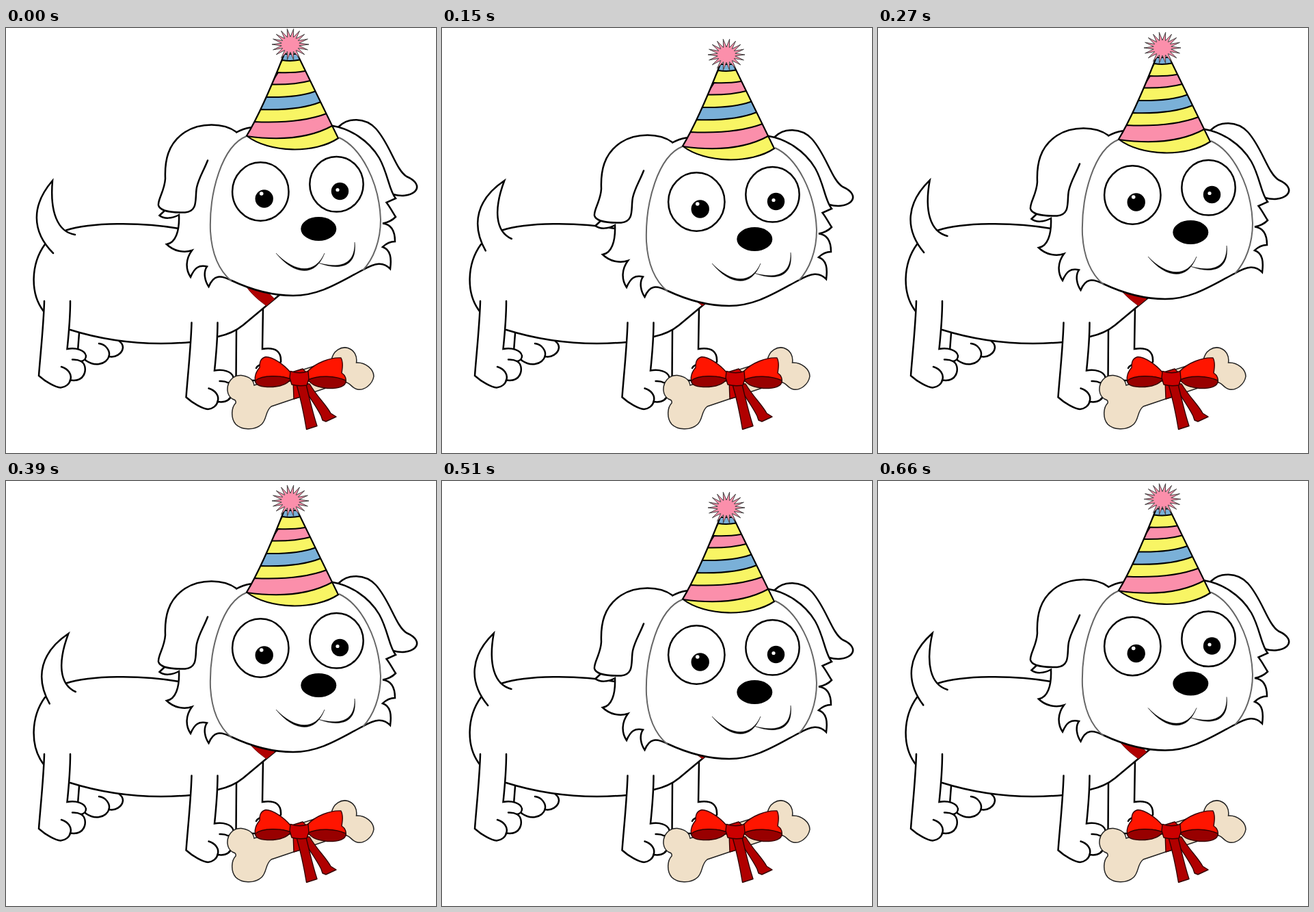
These frames come from a looping animation (629x621 px, 0.69 s). An HTML page:

```html
<!DOCTYPE html>
<html lang="en">
<head>
<meta charset="utf-8">
<title>Birthday puppy</title>
<style>
html, body { margin: 0; width: 100%; height: 100%; overflow: hidden; background: #fff; }
svg { display: block; width: 629px; height: 621px; }
.ink { fill: #fff; stroke: #000; stroke-width: 2.5; stroke-linejoin: miter; stroke-linecap: round; }
.line { fill: none; }
.face { fill: none; stroke: #666; stroke-width: 2; }
.bone { fill: #f0e0c8; stroke: #222; stroke-width: 1.5; }
.bow { stroke: #300; stroke-width: 1.4; stroke-linejoin: round; }
.red { fill: #ff1500; }
.mid { fill: #cc0000; }
.dark { fill: #b00000; }
.deep { fill: #980000; }
</style>
</head>
<body>
<svg viewBox="0 0 629 621">
  <defs>
    <g id="leg">
      <path d="M56 399C55 435 50 480 48 508C58 517 72 525 80 525.500C87 525 93 520 94 514.500C104 516 112 513 115 504C117 497 115 490 110 487C115 486 117 482 117 479C115 470 102 467 89.500 469C92 445 94 420 94 399"/>
      <path class="line" d="M97 484.500Q104 484 110 487M81 495C91 498 97 506 94 515"/>
    </g>
    <clipPath id="cone"><path id="coneShape" d="M407 38L426 38L486 161C452 184 385 183 352 157.500C370 128 392 76 407 38Z"/></clipPath>
  </defs>

  <g class="ink">
    <path d="M107 446L105 472C112 478 114 483 117 486C123 490 130 492 136 491C144 490 149 485 150.500 480C160 482 170 476 171 467C171 462 168 459 165 457"/>
    <path class="line" d="M136 461C146 462 153 472 150.500 480"/>
    <path d="M337 441L336.500 515L372 515L402 488C403 473 395 466 375 469L376 408"/>
    <path class="line" d="M366 497Q368 493 373 492"/>
    <path stroke="none" d="M88 295.500C122 284 198 283 253 293L405 386L380 406.500L347 434C335 443 325 448 310 451C240 468 145 458 94 441L55 416C35 390 34 345 57 316Z"/>
    <path class="line" d="M88 295.500C122 284 198 283 253 293M405 386L380 406.500L347 434C336 443 324 448 310 451M271 459C204 465 145 457 94 441M55 414C35 388 36 345 57 316"/>
    <use href="#leg"/>
    <use href="#leg" x="215.500" y="31.500"/>
    <path id="tail" d="M69 329C37 297 37 259 68 223C64 268 75 298 101 302"/>
  </g>

  <path d="M345 366C353 384 366 395 381 406L393 396C386 389 379 383 374 374Z" fill="#b00000" stroke="#600" stroke-width=".8"/>

  <g id="head">
    <g class="ink">
      <path d="M487 144C500 131 525 130 541 147C562 170 570 207 586 217C600 223 605 232 598 239C590 246 577 246 566 243"/>
      <path d="M234 265L224.500 274C231 279 242 279 253 273C254 297 248 314 235 316C245 326 260 329 272 325C263 337 262 352 270 364C276 350 282 346 294 348.500C288 357 291 370 296.500 378C304 360 314 361 330 369C362 384 392 391 420 391C460 391 490 370 522 353.500C540 343 552 341 562 352C564 337 563 324 551 320C556 315 562 312 569 312C569 298 565 287 551 285.500C560 284 565 281 570 276C566 270 562 262 556.500 255L570 249C560 237 559 213 546 190C530 163 502 147 478 143L357 145.500Q347 147 337 152.500"/>
      <path d="M337 152C318 138 284 138 262 152C236 169 232 195 233 220C232 238 222 250 223 259C225 268 245 270 262 269.500C282 268 276 248 279 233C282 219 289 209 295 193.500"/>
    </g>
    <path class="face" d="M352 158C316 172 297 240 299 297C301 330 312 355 330 370M487 160C520 175 546 226 548 280C548 310 538 337 522 354"/>
    <g class="ink">
      <ellipse cx="372.300" cy="239" rx="41.200" ry="42.700"/>
      <ellipse cx="483.500" cy="228.300" rx="39.200" ry="40.300"/>
    </g>
    <circle cx="377.700" cy="249.500" r="13.200"/>
    <circle cx="488.500" cy="238.500" r="12.700"/>
    <circle cx="373.700" cy="242" r="2.800" fill="#fff"/>
    <circle cx="485" cy="236.500" r="2.600" fill="#fff"/>
    <ellipse cx="457.300" cy="293.500" rx="26" ry="17.500"/>
    <path stroke="#000" stroke-width=".4" d="M395 329C420 360 452 366 466 329C451 362 421 356 395 329ZM458 343.500C482 353 515 353 510 313C511 350 483 350 458 343.500Z"/>
    <g id="bands" clip-path="url(#cone)" stroke="#000" stroke-width="2"></g>
    <use href="#coneShape" fill="none" stroke="#000" stroke-width="2.200"/>
    <path id="pom" fill="#fb8fab" stroke="#444" stroke-width="1"/>
  </g>

  <path class="bone" d="M324 530C323 517 332 507 344 507.500C355 509 362 514 363 522L476 486C478 471 491 465 500 467.500C510 471 514 480 512.500 489C526 488 538 499 538 509C536 521 524 530 514 528C505 526 504 518 495 517L388 553C379 560 382 571 374 579C363 589 344 587 336 579C328 569 330 554 336 548C337 544 334 543 331 542Q325 538 324 530Z"/>
  <g class="bow">
    <path class="mid" d="M418 503L434 498L441 505L441 536L421 542L420 515Z"/>
    <path class="dark" d="M432 520C441 536 453 551 461 567L463 573L468 575L483 568L475 563C468 550 456 540 444 520Z"/>
    <path class="dark" d="M425 521C432 545 436 565 439.500 586.500L455 581.500C448 560 444 541 439 521Z"/>
    <path class="red" d="M416 503C405 490 390 481 380 480.500C371 483 371 490 371 496C366 502 363 510 365 517L416 516Z"/>
    <path class="deep" d="M365 515C375 507 402 507 417 513C410 522 396 525 382 524.500C369 524 364 520 365 515Z"/>
    <path class="red" d="M441 502C453 489 475 481 490 482C494 489 492 498 491 504C497 508 498 513 497 518L442 516Z"/>
    <path class="deep" d="M442 514C457 507 482 508 497 515C498 524 486 527 470 526.500C456 525 447 522 442 514Z"/>
    <path class="mid" d="M416 501.500Q430 506 442 501.500L443 513L440 522Q428 524 418 521L415 511Z"/>
  </g>
</svg>
<script>
const $ = id => document.getElementById(id);
const yellow = '#f8f564', pink = '#fb8fab', blue = '#7ab0d8';

// Lower edge of each stripe: left point, control point, right point.
const stripes = [
  [yellow, '340 190 Q420 210 500 190'],
  [pink, '352 158 Q430 169 478 142.500'],
  [yellow, '363 137 Q429 140 469 125'],
  [blue, '372 119 Q428 121 460.500 108'],
  [yellow, '381 101 Q426 102 452.500 92.500'],
  [pink, '389 82.500 Q423 83 445 77'],
  [yellow, '398 65 Q420 66 437 63'],
  [blue, '404 47 Q417 49 430 46.500']
];
$('bands').innerHTML = stripes.map(([color, edge]) =>
  `<path fill="${color}" d="M340 20L340 157L${edge}L500 20Z"/>`).join('');

const spikes = 18;
$('pom').setAttribute('d', 'M' + Array.from({ length: spikes * 2 }, (_, i) => {
  const r = i % 2 ? 0.48 : 1;
  const a = i * Math.PI / spikes;
  return (416 + 27 * r * Math.cos(a)).toFixed(1) + ' ' + (24 + 23 * r * Math.sin(a)).toFixed(1);
}).join('L') + 'Z');

const STEP = 30, COUNT = 23;
const headKeys = [[0, 0], [5, 15], [11, 0], [17, 15], [23, 0]];
const tailKeys = [[0, 0], [5, 1], [11, 0], [13, 1], [16, 0], [19, 1], [25, 0]];

function tween(keys, n) {
  const i = keys.findIndex(k => k[0] > n);
  const [a, u] = keys[i - 1], [b, v] = keys[i];
  return u + (v - u) * (n - a) / (b - a);
}

function draw(ms) {
  const n = Math.floor(ms / STEP) % COUNT;
  $('head').setAttribute('transform', `translate(0 ${tween(headKeys, n)})`);
  $('tail').setAttribute('transform', `rotate(${15.6 * tween(tailKeys, n)} 79.5 308)`);
}

const start = performance.now();
function loop() {
  draw(performance.now() - start);
  requestAnimationFrame(loop);
}
loop();
</script>
</body>
</html>
```
